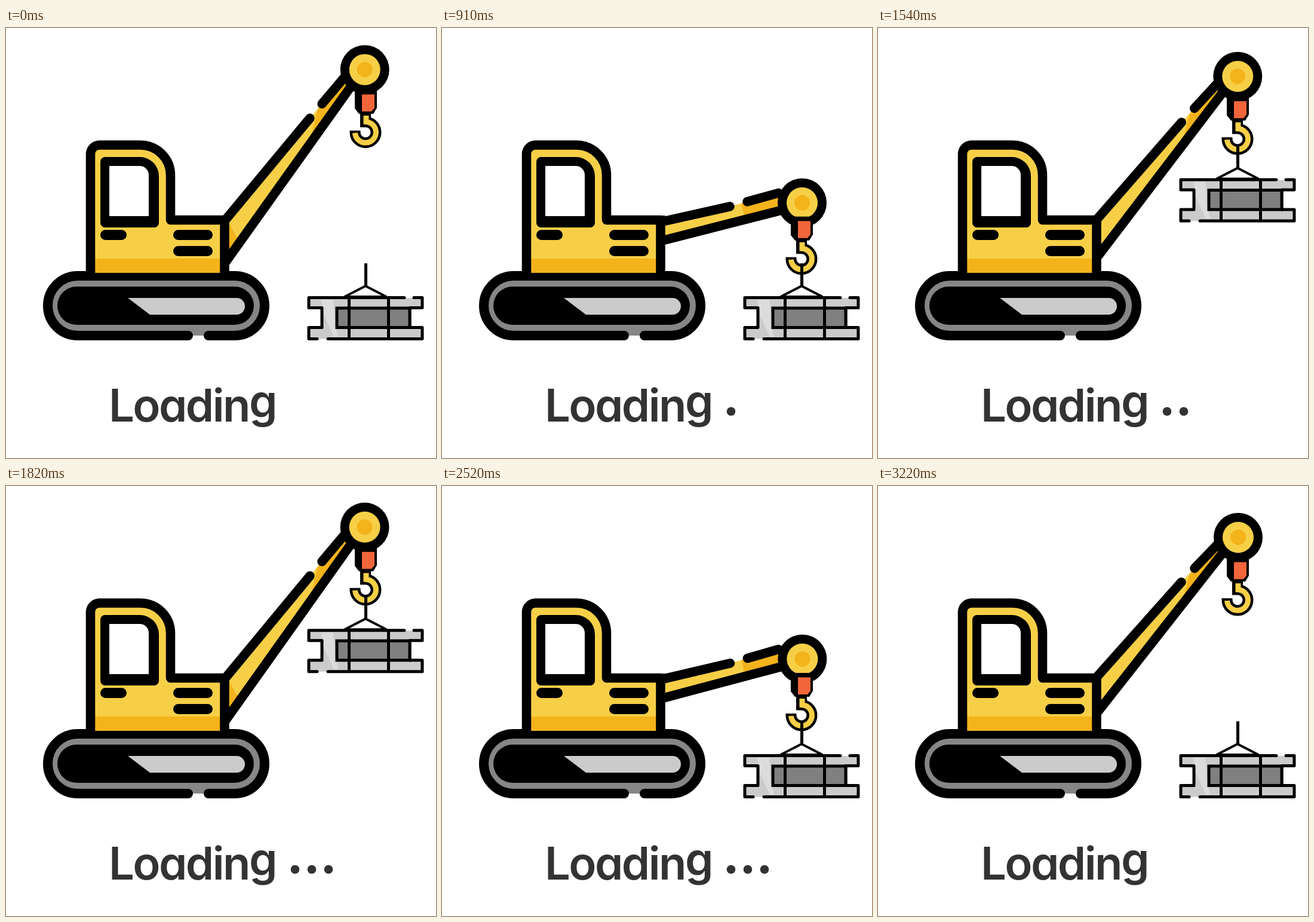
Write an HTML page that moves like this. It is 720 by 720 pixels and loops after 3.29 s.

```html
<!DOCTYPE html>
<html lang="en">
<head>
<meta charset="utf-8">
<title>Loading</title>
<style>
  html, body { margin: 0; height: 100%; overflow: hidden; background: #fff; }
  svg { display: block; width: 100vw; height: 100vh; }
  .line { fill: none; stroke: #000; stroke-width: 16; stroke-linecap: round; stroke-linejoin: round; }
  .thin { stroke: #000; stroke-width: 5; }
  .yellow { fill: #f7cf47; }
  .orange { fill: #f3b31b; }
  text { font: 600 76px Inter, sans-serif; font-feature-settings: "cv11"; letter-spacing: -2.6px; }
  .label { fill: #333; }
</style>
</head>
<body>
<svg viewBox="0 0 720 720">
  <g id="arm">
    <path id="fill" class="yellow"/>
    <path id="tip" class="orange"/>
    <path id="root" class="orange" d="M372 324L389 355L372 378Z"/>
    <path id="edges" class="line" style="stroke-width:15.5"/>
  </g>

  <g id="track">
    <rect x="70" y="415" width="363" height="100" rx="50" fill="#868686"/>
    <path class="line" d="M305 515H120a50 50 0 0 1 0-100H383a50 50 0 0 1 0 100H339"/>
    <rect x="86" y="433" width="329" height="64" rx="32"/>
    <path fill="#cbcbcb" d="M204 452H386a14 14 0 0 1 0 28H241Z"/>
  </g>

  <g id="body">
    <path class="yellow" d="M141.5 410V211a15 15 0 0 1 15-15H225a50.5 50.5 0 0 1 50.5 50.5V321.5H366V410Z"/>
    <path class="orange" d="M142 386H366V410H142Z"/>
    <path class="line" d="M141.5 414V211a15 15 0 0 1 15-15H225a50.5 50.5 0 0 1 50.5 50.5V321.5H366V414" style="stroke-width:15.5;stroke-linecap:butt"/>
    <path d="M360 314H373.5V330H360Z"/>
    <path d="M166 216H224a32 32 0 0 1 32 32V326a8 8 0 0 1-8 8H166a8 8 0 0 1-8-8V224a8 8 0 0 1 8-8Z"/>
    <path fill="#fff" d="M173 231H224a15 15 0 0 1 15 15V315H173Z"/>
    <path class="line" d="M166.500 346.500H193.500M288.500 346.500H337.500M288.500 373.500H337.500" style="stroke-width:17"/>
  </g>

  <g id="pulley">
    <circle r="41"/>
    <circle r="26" class="yellow"/>
    <circle r="13" class="orange"/>
  </g>

  <!-- drawn for a pulley height of 70 -->
  <g id="hook">
    <path d="M584 104H621V134L615 144H591L584 135Z"/>
    <path fill="#f0663a" d="M596 111.500H617V134L612 140H596Z"/>
    <g fill="none">
      <path stroke="#000" stroke-width="18" d="M602 142V157.500A17.500 17.500 0 1 1 584.500 175V172"/>
      <path stroke="#f7cf47" stroke-width="9" d="M603 147V157.500A17.500 17.500 0 1 1 584.500 176"/>
    </g>
  </g>

  <g id="block">
    <path class="thin" fill="#fff" style="stroke-width:4" d="M602 432L567 450H637Z"/>
    <path class="thin" d="M602.500 394V432"/>
    <path fill="#cbcbcb" d="M507 452H697V468.500H676V501.500H697V520.500H507V501.500H529V468.500H507Z"/>
    <path fill="#dcdcdc" d="M528 455H548L552 500L556 517H549L531 478Z"/>
    <path class="thin" fill="none" stroke-linecap="round" stroke-linejoin="round"
      d="M667 451.500H507V468.500H529V501.500H507V520.500H521M539 520.500H697V501.500H676V468.500H697V451.500H683"/>
    <path class="thin" fill="#808080" d="M554 469H676V501.500H554Z"/>
    <path class="thin" d="M574.500 450V521M640.500 450V521"/>
  </g>

  <text class="label" x="172" y="658.500">Loadin<tspan dy="-7">g</tspan></text>
  <g id="dots" class="label">
    <circle cx="484" cy="642" r="7.300"/>
    <circle cx="512" cy="642" r="7.300"/>
    <circle cx="540" cy="642" r="7.300"/>
  </g>
</svg>
<script>
const STEP = 70, STEPS = 47, TOP = 68, BOTTOM = 293;
const LEG = 12;                              // steps per stroke of the arm
const STARTS = [-10.65, 1.55, 13.55, 25.9, 38.1];  // up, down, up, down, up

// Arm poses: pulley y, pulley x, upper base y, gap start x y, gap end x y,
// lower base y, lower end below the pulley centre
const POSES = [
  [68, 600.5, 362, 509, 150, 529, 126, 397, 28],
  [86, 603, 356, 508, 161, 530, 138, 382, 25],
  [149, 610, 327, 501, 206, 526, 187, 350, 23],
  [174, 611, 322, 499, 219, 524, 203, 345, 22],
  [235, 609, 326, 491, 260, 518, 247, 349, 16],
  [293, 603, 332, 482, 299, 511, 291, 357, 10]
];

const get = id => document.getElementById(id);
const mix = (a, b, k) => a + (b - a) * k;
const move = (id, x, y) => get(id).setAttribute('transform', `translate(${x} ${y})`);
const path = (id, d) => get(id).setAttribute('d', d);

// The standard "ease" curve, cubic-bezier(.25, .1, .25, 1)
function ease(x) {
  if (x <= 0) return 0;
  if (x >= 1) return 1;
  const curve = (s, a, b) => 3 * (1 - s) ** 2 * s * a + 3 * (1 - s) * s * s * b + s ** 3;
  let lo = 0, hi = 1;
  for (let i = 0; i < 24; i++) {
    const mid = (lo + hi) / 2;
    if (curve(mid, .25, .25) < x) lo = mid; else hi = mid;
  }
  return curve(lo, .1, 1);
}

function poseAt(y) {
  let i = 0;
  while (i < POSES.length - 2 && y > POSES[i + 1][0]) i++;
  const a = POSES[i], b = POSES[i + 1], k = (y - a[0]) / (b[0] - a[0]);
  return a.map((v, j) => mix(v, b[j], k));
}

function drawArm([y, x, upY, ax, ay, bx, by, lowY, drop]) {
  const endX = 578, endY = y + drop;
  const upper = `M334 ${upY}L${ax} ${ay}`;
  const outer = `${bx} ${by}L${bx + 1.8 * (bx - ax)} ${by + 1.8 * (by - ay)}`;
  const end = `${endX} ${endY}`;
  path('fill', `${upper}L${outer}L${end}L365 ${lowY}Z`);
  path('tip', `M${mix(ax, bx, .65)} ${mix(ay, by, .65)}L${outer}L${end}` +
    `L${mix(365, endX, .67)} ${mix(lowY, endY, .67)}Z`);
  path('edges', `${upper}M${outer}M365 ${lowY}L${end}`);
  get('root').style.display = y < 78 ? '' : 'none';
  move('pulley', x, y);
}

function draw(now) {
  const n = Math.floor(now / STEP) % STEPS;
  let leg = 0;
  while (leg < 4 && n >= STARTS[leg + 1]) leg++;
  const k = ease((n - STARTS[leg]) / LEG);
  const y = leg % 2 ? mix(TOP, BOTTOM, k) : mix(BOTTOM, TOP, k);
  drawArm(poseAt(y));

  const hookY = y - 11 * Math.max(0, (y - 174) / 119);
  move('hook', 0, hookY - 70);
  const carrying = leg === 2 || leg === 3;
  move('block', 0, carrying ? Math.min(0, hookY - 278.5) : 0);

  const count = leg % 4;
  [...get('dots').children].forEach((dot, i) => {
    dot.style.display = i < count ? '' : 'none';
  });
}

const start = performance.now();
function tick() {
  draw(performance.now() - start);
  requestAnimationFrame(tick);
}
tick();
</script>
</body>
</html>
```
